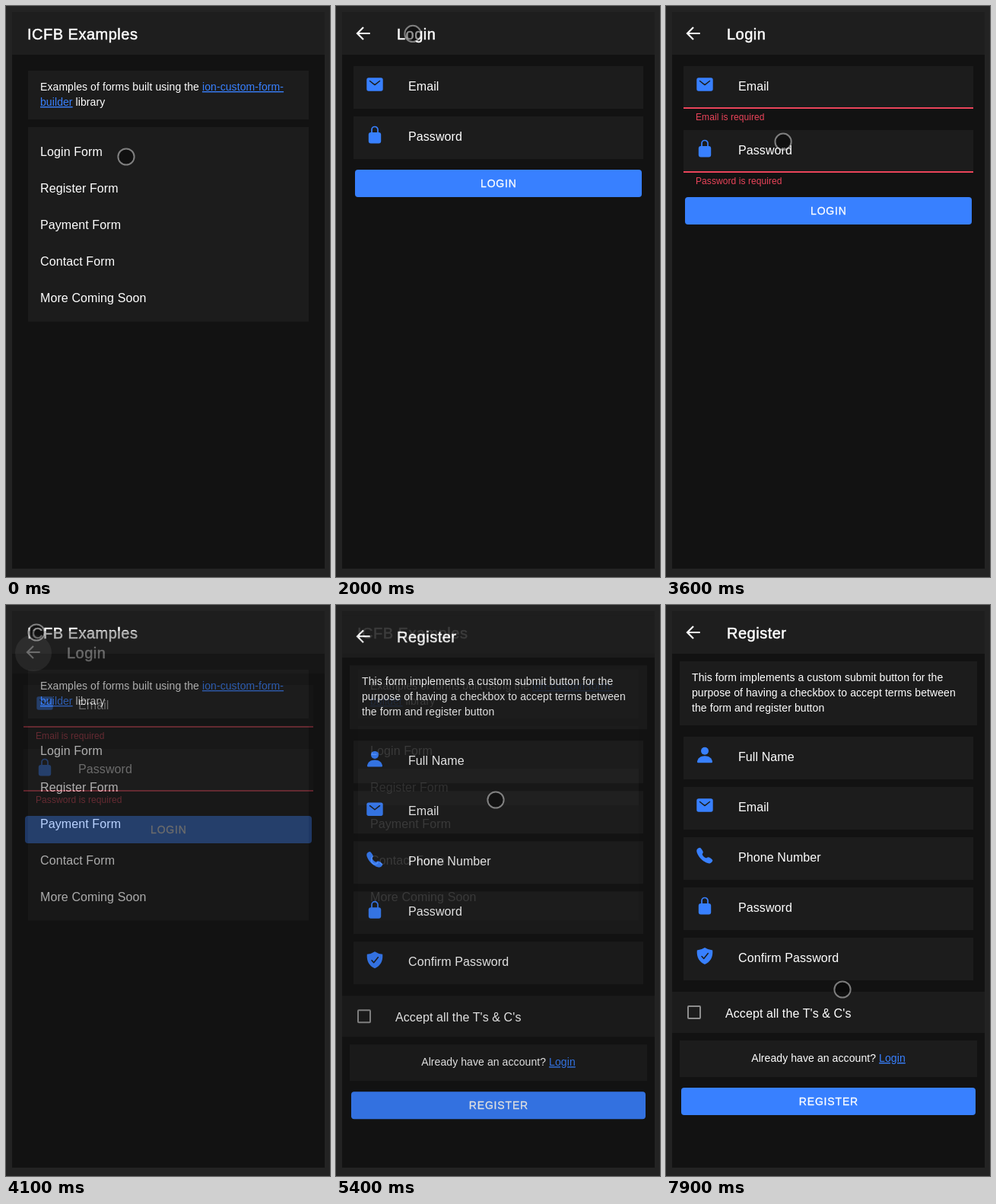
Animation of 426x750 px, one loop 8 s. Source, as an HTML page:

```html
<!DOCTYPE html>
<html lang="en">
<head>
<meta charset="utf-8">
<title>Form examples</title>
<style>
  html, body { margin: 0; width: 100%; height: 100%; overflow: hidden; background: #232323; }
  #stage { display: block; width: 426px; height: 750px; }
  text { font: 16px "Liberation Sans", Arial, sans-serif; letter-spacing: .006em; fill: #fff; white-space: pre; }
  .title { font-size: 20px; letter-spacing: .5px; stroke: #fff; stroke-width: .5px; }
  .small { font-size: 14px; }
  .button { font-size: 14px; letter-spacing: .06em; text-anchor: middle; stroke: #fff; stroke-width: .3px; }
  .error { font-size: 12px; fill: #eb445a; }
  .status { font: 12px Inter, sans-serif; letter-spacing: 0; fill: #c4c6c9; }
  .middle { text-anchor: middle; }
  .link { fill: #3880ff; text-decoration: underline; }
  .icon { fill: #3880ff; }
  .line { fill: none; stroke: #1c1c1c; stroke-width: 1.5; stroke-linecap: round; stroke-linejoin: round; }
</style>
</head>
<body>
<svg id="stage" viewBox="0 0 426 750"></svg>
<script>
const LOOP = 8000, STEP = 100;
const CARD = '#1c1c1c', BLUE = '#3880ff', RED = '#eb445a';

const icons = {
  mail: '<rect x="-10.7" y="-8.7" width="21.4" height="17.4" rx="2.6"/><path class="line" d="M-6.5-4.5 0 .6 6.5-4.5"/>',
  lock: '<rect x="-8.2" y="-3" width="16.4" height="14.5" rx="3"/>' +
        '<path d="M-4-2V-6.5a4 4 0 0 1 8 0V-2" fill="none" stroke="#3880ff" stroke-width="1.7"/>',
  person: '<circle cy="-5.3" r="5"/><path d="M-10 9C-9.5 4 -5 1.3 0 1.3S9.5 4 10 9Q10 10.3 8.8 10.3H-8.8Q-10 10.3 -10 9Z"/>',
  call: '<path d="M-10.3-8C-9-9.5-7.5-10.3-6.5-10.3C-5-10-2.5-6-2.2-4.6C-2-3-3.6-2.6-3.2-1.2C-2.5.8-.6 2.6 1.3 3.2' +
        'C2.6 3.5 3.2 2 4.8 2.2C6.5 2.6 10 5 10.3 6.2C10.4 7.6 8.5 10 6.5 10.4C2.5 10.6-2.5 7-5 4.5C-8 1.2-12-4.5-10.3-8Z"/>',
  shield: '<path d="M0-11Q-4-8.2-10.2-7.5C-11 2-7 8 0 11C7 8 11 2 10.2-7.5Q4-8.2 0-11Z"/><path class="line" d="M-4 .5-1.3 3.5 4.3-3.5"/>'
};

const rect = (x, y, w, h, fill = CARD, extra = '') =>
  `<rect x="${x}" y="${y}" width="${w}" height="${h}" fill="${fill}" ${extra}/>`;
const text = (x, y, content, cls = '') => `<text x="${x}" y="${y}" class="${cls}">${content}</text>`;
const link = label => `<tspan class="link">${label}</tspan>`;
const field = (y, icon, label) => rect(23, y, 381, 56) +
  `<g class="icon" transform="translate(51 ${y + 24})">${icons[icon]}</g>` + text(95, y + 32, label);
const button = (x, y, w, label) => rect(x, y, w, 36, BLUE, 'rx="4"') + text(213.9, y + 23, label, 'button');
const error = (y, label) => `<g class="invalid">${rect(23, y, 381, 2, RED)}${text(39, y + 17, label, 'error')}</g>`;
const backArrow = '<path d="M44.7 36H28.5M36 28 28 36 36 44" fill="none" stroke="#fff" stroke-width="2.2"/>';
const page = (id, title, hasBack, body) => `<g id="${id}">${rect(8, 8, 411, 731, '#121212')}${rect(8, 8, 411, 56, '#1e1e1e')}` +
  (hasBack ? '<circle class="ripple" cx="36" cy="37" r="24" fill="#fff" opacity="0"/>' + backArrow : '') +
  text(hasBack ? 80 : 28, 44, title, 'title') + body + '</g>';

const rows = ['Login Form', 'Register Form', 'Payment Form', 'Contact Form', 'More Coming Soon'];
const home = page('home', 'ICFB Examples', false,
  rect(29, 85, 369, 64) +
  text(45, 111, 'Examples of forms built using the ' + link('ion-custom-form-'), 'small') +
  text(45, 131, link('builder') + ' library', 'small') +
  rect(29, 159, 369, 255.5) + rect(29, 167, 369, 48, '#fff', 'id="pressed"') +
  rows.map((label, i) => text(45, 197 + 48 * i, label)).join(''));

const login = page('login', 'Login', true,
  field(79, 'mail', 'Email') + error(133, 'Email is required') +
  `<g id="second">${field(145, 'lock', 'Password')}${error(199, 'Password is required')}</g>` +
  `<g id="submit">${button(25, 215, 377, 'LOGIN')}</g>`);

const intro = ['This form implements a custom submit button for the',
  'purpose of having a checkbox to accept terms between', 'the form and register button'];
const fields = [['person', 'Full Name'], ['mail', 'Email'], ['call', 'Phone Number'],
  ['lock', 'Password'], ['shield', 'Confirm Password']];
const register = page('register', 'Register', true,
  rect(18, 74, 391, 84) + intro.map((s, i) => text(34, 100 + 20 * i, s, 'small')).join('') +
  fields.map(([icon, label], i) => field(173 + 66 * i, icon, label)).join('') +
  rect(8, 508, 411, 54) + rect(29, 527, 16, 16, 'none', 'rx="1" stroke="#8e8e8e" stroke-width="2"') +
  text(78, 542, "Accept all the T's &amp; C's") +
  rect(18, 572, 391, 48) + text(213.5, 600, 'Already have an account? ' + link('Login'), 'small middle') +
  button(20, 634, 387, 'REGISTER'));

const $ = s => document.querySelector(s);
$('#stage').innerHTML =
  `<svg x="8" y="8" width="411" height="731" viewBox="8 8 411 731">${home}${login}${register}</svg>` +
  `<g id="status">${rect(7.5, 718.5, 125, 21, '#1d1e20', 'stroke="#38393b"')}${text(13, 733, 'localhost:8101/login', 'status')}</g>` +
  '<circle id="cursor" r="10.6" fill="#000" fill-opacity=".42" stroke="#fff" stroke-opacity=".45" stroke-width="2"/>';

// Cubic Bézier easing, solved by bisection
const bezier = (x1, y1, x2, y2) => p => {
  if (p <= 0) return 0;
  if (p >= 1) return 1;
  const at = (a, b, u) => 3 * (1 - u) ** 2 * u * a + 3 * (1 - u) * u * u * b + u ** 3;
  let low = 0, high = 1;
  for (let i = 0; i < 24; i++) {
    const mid = (low + high) / 2;
    if (at(x1, x2, mid) < p) low = mid; else high = mid;
  }
  return at(y1, y2, low);
};
const enter = bezier(.36, .66, .04, 1), leave = bezier(.47, 0, .745, .715);
const clamp = p => Math.max(0, Math.min(1, p));

// Pointer stops: time, x, y
const path = [
  [0, 158, 198], [300, 158, 198], [900, 160, 192], [1100, 162, 189], [1500, 95, 88], [1600, 95, 88],
  [1900, 89, 20], [2500, 251, 242], [3100, 194, 228], [3400, 194, 228], [4000, 40, 36], [4150, 40, 36],
  [4300, 44, 54], [5200, 210, 256], [6300, 210, 256], [6800, 215, 278], [7200, 236, 523],
  [7700, 264, 582], [7800, 264, 582], [7900, 232, 505], [8000, 232, 505]
];
function pointer(t) {
  const i = path.findIndex(stop => stop[0] > t);
  const [t0, x0, y0] = path[i - 1], [t1, x1, y1] = path[i];
  const p = (t - t0) / (t1 - t0), e = p * p * (3 - 2 * p);
  return [x0 + (x1 - x0) * e, y0 + (y1 - y0) * e];
}

const move = (sel, x, y) => $(sel).setAttribute('transform', `translate(${x} ${y})`);
const fade = (sel, value) => document.querySelectorAll(sel).forEach(el => el.setAttribute('opacity', value));
function showPage(sel, amount) {
  move(sel, 0, 40 * (1 - amount));
  fade(sel, amount);
}

function draw(t) {
  showPage('#login', t < 3949 ? enter((t - 290) / 280) : 1 - leave((t - 3949) / 200));
  showPage('#register', enter((t - 5296) / 280));

  const second = t > 2000;
  move('#pressed', 0, second ? 48 : 0);
  fade('#pressed', t < 600 || second ? .16 * clamp((t - (second ? 5230 : 230)) / 70) : 0);

  const invalid = t >= 3250;
  fade('.invalid', invalid ? 1 : 0);
  move('#second', 0, invalid ? 18 : 0);
  move('#submit', 0, invalid ? 36 : 0);
  fade('#login .ripple', .2 * clamp((t - 3800) / 150));

  fade('#status', t >= 400 && t < 1050 ? 1 : 0);
  move('#cursor', ...pointer(t));
}

function tick() {
  draw(Math.floor(performance.now() % LOOP / STEP) * STEP);
  requestAnimationFrame(tick);
}
tick();
</script>
</body>
</html>
```
